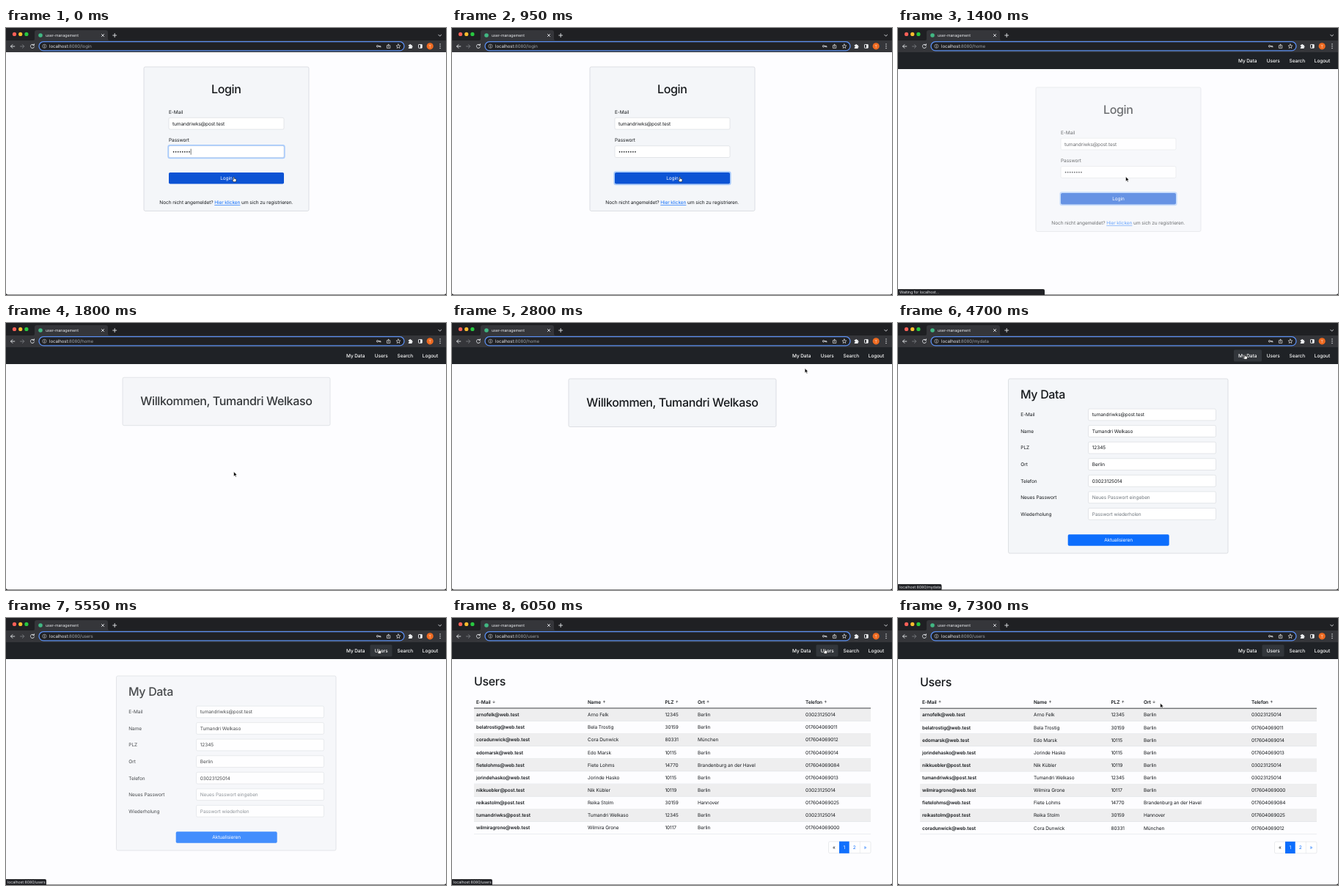
These frames come from a looping animation (600 by 364 pixels, 8000 ms). An HTML page:

```html
<!DOCTYPE html>
<html lang="de">
<head>
<meta charset="utf-8">
<title>user-management</title>
<style>
  html, body { margin: 0; width: 100%; height: 100%; overflow: hidden; background: #fdfdff; }
  svg { display: block; width: 100vw; height: 100vh; }
  text { font-family: Inter, Roboto, sans-serif; letter-spacing: -.07px; text-rendering: geometricPrecision; white-space: pre; }
  .icon { fill: none; stroke: #e4e6e9; stroke-width: .9; stroke-linecap: round; stroke-linejoin: round; }
</style>
</head>
<body>
<svg id="stage" viewBox="0 0 600 364"></svg>
<script>
const LOOP = 8000, FADE = 300, SHIFT = 13;
const INK = '#16191c', BLUE = '#0d6efd', LINE = '#d3d7dc';
const MAIL = 'tumandriwks@post.test', NAME = 'Tumandri Welkaso';

const text = (x, y, str, { size = 6.5, fill = INK, weight = 400, anchor = 'start', extra = '' } = {}) =>
  `<text x="${x}" y="${y + size * .364}" font-size="${size}" fill="${fill}" font-weight="${weight}" text-anchor="${anchor}" ${extra}>${str}</text>`;
const title = (x, y, str, anchor = 'start') =>
  text(x, y, str, { size: 16, weight: 500, anchor, extra: 'style="letter-spacing:-.35px"' });
const rect = (x, y, w, h, fill, r = 0, extra = '') =>
  `<rect x="${x}" y="${y}" width="${w}" height="${h}" rx="${r}" fill="${fill}" ${extra}/>`;
const outline = (color, width = .6) => `stroke="${color}" stroke-width="${width}"`;
const circle = (x, y, r, fill, extra = '') => `<circle cx="${x}" cy="${y}" r="${r}" fill="${fill}" ${extra}/>`;
const icon = (d, extra = '') => `<path class="icon" d="${d}" ${extra}/>`;
const group = (id, body) => `<g id="${id}">${body}</g>`;
const card = (x, y, w, h) => rect(x, y, w, h, '#f4f6f9', 2, outline('#cbcfd4'));
const input = (x, y, w) => rect(x, y, w, 15.8, '#fff', 1.8, outline(LINE));
const button = (x, y, w, label, fill) =>
  rect(x, y, w, 15.6, fill, 1.8) + text(x + w / 2, y + 7.9, label, { fill: '#fff', anchor: 'middle' });

function browser() {
  const lights = ['#ff5f57', '#febc2e', '#28c840'].map((c, i) => circle(11.5 + 8.2 * i, 8.4, 2.6, c)).join('');
  const dots = [22, 24.8, 27.6].map(y => circle(592, y, .75, '#e4e6e9')).join('');
  return rect(0, 0, 600, 33, '#1f2023') + rect(0, 17, 600, 16, '#35363a') +
    `<path d="M37 17Q39 17 39 15V6Q39 3 42 3H136Q139 3 139 6V15Q139 17 141 17Z" fill="#35363a"/>` + lights +
    circle(47, 10, 2.8, '#41b883') +
    text(54, 10, 'user-management', { size: 5.3, fill: '#e8eaed' }) +
    icon('M130.4 8.4l3.2 3.2m0-3.2l-3.2 3.2M145.7 10h5m-2.5-2.5v5M589.8 9.2l1.9 1.9 1.9-1.9') +
    icon('M11.8 25H6.6m2.3-2.4L6.5 25l2.4 2.4') +
    icon('M19.5 25h5.2m-2.3-2.4 2.4 2.4-2.4 2.4', 'style="stroke:#797b7f"') +
    icon('M38 23.2a2.6 2.6 0 1 0 .5 2.5M38.4 21.8v1.8h-1.8') +
    rect(45, 18.7, 498, 12.2, '#202124', 6.1, outline('#5b8ff0', 1.3)) +
    icon('M52.4 24.8v1.4M52.4 23.4v.1', 'style="stroke-width:.7"') +
    circle(52.4, 24.8, 2.6, 'none', outline('#c4c7cb')) +
    `<text x="59" y="27.1" font-size="6.1" fill="#e8eaed">localhost:<tspan id="path" fill="#9aa0a6"></tspan></text>` +
    circle(506.6, 24.8, 1.2, 'none', outline('#e4e6e9', .9)) + icon('M507.9 24.8h3v1.2m-1.3-1.2v1') +
    icon('M520.4 23.8h-1v3.6h4.4v-3.6h-1M521.6 26v-3.8m-1.2 1.2 1.2-1.2 1.2 1.2', 'style="stroke-width:.7"') +
    icon('M535 22l.8 1.9 2.1.2-1.6 1.4.5 2-1.8-1.1-1.8 1.1.5-2-1.6-1.4 2.1-.2z', 'style="stroke-width:.7"') +
    `<path d="M548.8 23h1.4a1 1 0 0 1 2 0h1.4v1.6a1 1 0 0 1 0 2v1.4h-4.8v-1.4a1 1 0 0 0 0-2z" fill="#eceef0"/>` +
    rect(562.5, 22.5, 4.8, 4.8, 'none', .5, outline('#eceef0', .9)) + rect(565, 22.5, 2.3, 4.8, '#eceef0') +
    circle(578.2, 24.8, 4.6, '#ef6a20') + text(578.2, 24.8, 'T', { size: 5, fill: '#fff', anchor: 'middle' }) + dots;
}

function navbar() {
  const item = (x, label) => text(x, 44.5, label, { fill: '#fff', weight: 500 });
  return rect(0, 33, 600, 23, '#1f2226') +
    rect(458, 36.6, 38, 16, '#32363b', 1.5, 'id="hotData"') + rect(496.5, 36.6, 30, 16, '#32363b', 1.5, 'id="hotUsers"') +
    item(464, 'My Data') + item(502.8, 'Users') + item(533.6, 'Search') + item(567.8, 'Logout');
}

function loginPage() {
  const dots = Array.from({ length: 8 }, (_, i) => circle(228.6 + 3.05 * i, 168.8, .85, INK)).join('');
  const ring = (id, y, h) => rect(221.2, y - .8, 158.6, h + 1.6, 'none', 2.4, `id="${id}" ${outline('#a9cbfb', 1.7)}`);
  return card(188, 53, 225, 196.5) + title(300.3, 83.5, 'Login', 'middle') +
    text(222, 114.4, 'E-Mail') + input(222, 122.3, 157) + text(227, 130.4, MAIL) +
    text(222, 153, 'Passwort') + input(222, 160.7, 157) + ring('fieldRing', 160.7, 15.8) + dots +
    rect(251.8, 164.7, .6, 8, INK, 0, 'id="caret"') +
    ring('buttonRing', 197, 15.6) + button(222, 197, 157, 'Login', '#0c53d4') +
    text(300.4, 238, `Noch nicht angemeldet? <tspan fill="${BLUE}" text-decoration="underline">Hier klicken</tspan> um sich zu registrieren.`, { anchor: 'middle' });
}

const welcomePage = () => card(159, 76, 283, 65.5) + title(300.4, 107.8, `Willkommen, ${NAME}`, 'middle');

function dataPage() {
  const fields = [['E-Mail', MAIL], ['Name', NAME], ['PLZ', '12345'], ['Ort', 'Berlin'], ['Telefon', '03023125014'],
    ['Neues Passwort', 'Neues Passwort eingeben'], ['Wiederholung', 'Passwort wiederholen']];
  const rows = fields.map(([label, value], i) => {
    const y = 125 + 22.55 * i;
    return text(167.3, y, label) + input(259.5, y - 7.9, 174) + text(264.8, y, value, { fill: i > 4 ? '#70777e' : INK });
  });
  return card(150.5, 76, 299.5, 238) + title(167, 97.3, 'My Data') + rows.join('') +
    button(231.7, 288.2, 138, 'Aktualisieren', BLUE);
}

const COLUMNS = [33, 185, 290.5, 335, 482];
const PEOPLE = [
  ['arnofelk@web.test', 'Arno Felk', '12345', 'Berlin', '03023125014'],
  ['belatrostig@web.test', 'Bela Trostig', '30159', 'Berlin', '017604069011'],
  ['coradunwick@web.test', 'Cora Dunwick', '80331', 'München', '017604069012'],
  ['edomarsk@web.test', 'Edo Marsk', '10115', 'Berlin', '017604069014'],
  ['fietelohms@web.test', 'Fiete Lohms', '14770', 'Brandenburg an der Havel', '017604069084'],
  ['jorindehasko@web.test', 'Jorinde Hasko', '10115', 'Berlin', '017604069013'],
  ['nikkuebler@post.test', 'Nik Kübler', '10119', 'Berlin', '03023125014'],
  ['reikastolm@post.test', 'Reika Stolm', '30159', 'Hannover', '017604069025'],
  [MAIL, NAME, '12345', 'Berlin', '03023125014'],
  ['wilmiragrone@web.test', 'Wilmira Grone', '10117', 'Berlin', '017604069000'],
];

function table(sortColumn) {
  const sorted = [...PEOPLE].sort((a, b) => a[sortColumn].localeCompare(b[sortColumn], 'de'));
  const head = ['E-Mail', 'Name', 'PLZ', 'Ort', 'Telefon'].map((label, i) =>
    text(COLUMNS[i], 114.5, `${label}<tspan dx="2.3" dy="-1" font-size="4.6">${i === sortColumn ? '↓' : '↑'}</tspan>`, { weight: 600 }));
  const rows = sorted.map((person, i) => {
    const y = 123.5 + 17.14 * i;
    return rect(30, y, 541, 17.14, i % 2 ? 'none' : '#eeeeef') + rect(30, y + 16.8, 541, .5, '#d9dce0') +
      person.map((cell, c) => text(COLUMNS[c], y + 8.5, cell, { weight: c ? 400 : 600 })).join('');
  });
  return head.join('') + rows.join('') + rect(30, 122.7, 541, .9, '#25282c');
}

function usersPage() {
  const label = (x, str, fill) => text(x, 313, str, { fill, anchor: 'middle' });
  return title(30, 86.8, 'Users') + group('byMail', table(0)) + group('byTown', table(3)) +
    rect(513.5, 305, 57.5, 15.8, '#fff', 1.8, outline('#dadde1')) +
    rect(555.9, 305, .5, 15.8, '#dadde1') + rect(528, 304.8, 13.7, 16.2, BLUE) +
    label(520.8, '«', INK) + label(534.9, '1', '#fff') + label(548.8, '2', BLUE) + label(563.3, '»', BLUE);
}

const pointers =
  `<path id="arrow" d="M0 0V6.2L1.5 4.9 2.5 7.1 3.5 6.6 2.5 4.5H4.4Z" fill="#000" stroke="#fff" stroke-width=".5"/>` +
  `<path id="hand" d="M-.6 .5Q0 -.4 .6 .5V2.5L2.8 3Q3.6 3.3 3.4 4.4L2.9 6.9H-.4L-2 4.6Q-2 3.6-.6 4.5Z" fill="#fff" stroke="#111" stroke-width=".6"/>`;

document.getElementById('stage').innerHTML =
  group('login', loginPage()) + group('welcome', welcomePage()) + group('data', dataPage()) + group('users', usersPage()) +
  group('nav', navbar()) + browser() +
  group('status', `<path id="statusBox" fill="#222327"/>` + text(2, 360.3, '', { size: 5.3, fill: '#e2e4e7', extra: 'id="statusText"' })) +
  `<path d="M0 361.5Q.3 363.4 2.5 363.4H597.5Q599.7 363.4 600 361.5V364H0Z" fill="#1c1c1e"/>` +
  group('pointer', pointers);

const $ = id => document.getElementById(id);
const show = (id, on) => $(id).setAttribute('display', on ? 'inline' : 'none');
const clamp = v => Math.min(1, Math.max(0, v));
const smooth = v => v * v * (3 - 2 * v);

// The CSS "ease" curve, cubic-bezier(.25, .1, .25, 1).
function ease(p) {
  const bezier = (a, b, s) => 3 * a * s * (1 - s) ** 2 + 3 * b * s * s * (1 - s) + s ** 3;
  let low = 0, high = 1;
  for (let i = 0; i < 20; i++) {
    const mid = (low + high) / 2;
    if (bezier(.25, .25, mid) < p) low = mid; else high = mid;
  }
  return bezier(.1, 1, low);
}

const TO_HOME = 1330, TO_DATA = 3250, TO_USERS = 5500, CLICK_LOGIN = 850, SORT = 7100;
const PAGES = [
  { id: 'login', enter: -FADE, leave: TO_HOME },
  { id: 'welcome', enter: TO_HOME + FADE, leave: TO_DATA },
  { id: 'data', enter: TO_DATA + FADE, leave: TO_USERS },
  { id: 'users', enter: TO_USERS + FADE, leave: LOOP },
];
const ROUTES = [[0, 'login'], [TO_HOME, 'home'], [TO_DATA, 'mydata'], [TO_USERS, 'users']];
const STATUS = [[0, '', 0], [TO_HOME, 'Waiting for localhost...', 200], [1800, '', 0], [3150, 'localhost:8080/mydata', 59.5],
  [5150, 'localhost:8080/users', 55], [6750, '', 0]];
const MOVES = [[0, 310.6, 202.8], [2200, 310.6, 202.8], [2800, 481.2, 61.8], [2980, 481.2, 61.8], [3180, 473, 42.6],
  [4850, 473, 42.6], [5200, 508.3, 41.8], [6500, 508.3, 41.8], [7000, 357.7, 116.2], [LOOP, 357.7, 116.2]];
const current = (list, t) => list.findLast(([start]) => start <= t);

function draw(t) {
  for (const { id, enter, leave } of PAGES) {
    const shown = ease(clamp((t - enter) / FADE)), gone = ease(clamp((t - leave) / FADE));
    const base = id === 'login' && t >= TO_HOME ? 23 : 0;
    show(id, t >= enter && t < leave + FADE);
    $(id).setAttribute('opacity', shown * (1 - gone));
    $(id).setAttribute('transform', `translate(0 ${base + SHIFT * (shown - 1 + gone)})`);
  }
  show('nav', t >= TO_HOME);
  show('hotData', t >= 3130 && t < TO_USERS);
  show('hotUsers', t >= 5060);
  show('fieldRing', t < CLICK_LOGIN);
  show('caret', t < 500);
  show('buttonRing', t >= CLICK_LOGIN);
  show('byMail', t < SORT);
  show('byTown', t >= SORT);

  $('path').textContent = '8080/' + current(ROUTES, t)[1];
  const [, message, width] = current(STATUS, t);
  show('status', message);
  $('statusText').textContent = message;
  $('statusBox').setAttribute('d', `M0 356H${width - 2}q2 0 2 2V364H0Z`);

  const next = MOVES.findIndex(([time]) => time > t);
  const [t0, x0, y0] = MOVES[next - 1], [t1, x1, y1] = MOVES[next];
  const p = smooth((t - t0) / (t1 - t0));
  $('pointer').setAttribute('transform', `translate(${x0 + (x1 - x0) * p} ${y0 + (y1 - y0) * p})`);
  const overLink = t < TO_HOME || (t >= 3130 && t < 6590);
  show('hand', overLink);
  show('arrow', !overLink);
}

const start = performance.now();
function frame() {
  draw((performance.now() - start) % LOOP);
  requestAnimationFrame(frame);
}
frame();
</script>
</body>
</html>
```
